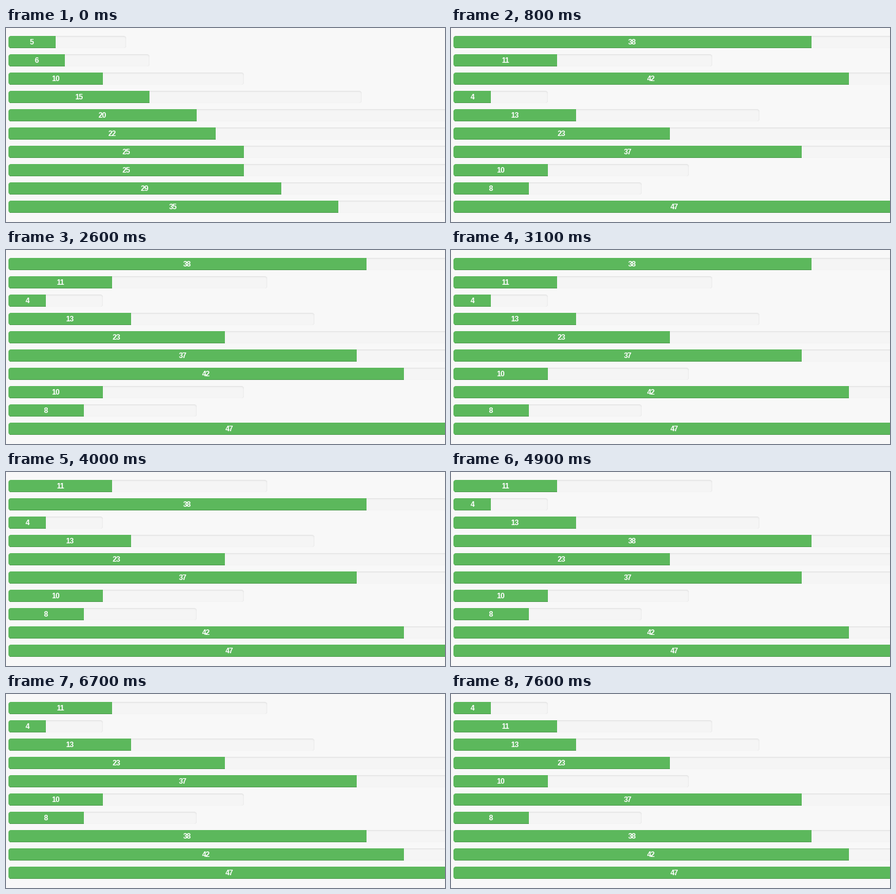
A matplotlib script for the animation above (8 s loop, 716 by 318 pixels).

```python
import matplotlib.pyplot as plt
from matplotlib.animation import FuncAnimation
from matplotlib.patches import PathPatch, Rectangle
from matplotlib.path import Path

W, H, DPI = 716, 318, 100
TICK, LOOP = 100, 8000
LEFT, TOP, ROW, BAR = 4, 13, 30, 20
UNIT, RADIUS = 15.36, 4
GREEN, GREEN_EDGE = "#5cb85c", "#4e9c4e"

# Nested track layers: colour, left, top, right and bottom inset, corner radius
LAYERS = [
    ("#e4e4e4", 0, 0, 0, 0, 4),
    ("#ededed", 0, 1, 0, 0, 4),
    ("#f3f3f3", 1, 2, 1, 0, 3),
    ("#f5f5f5", 2, 3, 2, 1, 2),
]

SORTED = [5, 6, 10, 15, 20, 22, 25, 25, 29, 35]
SHUFFLED = [38, 42, 11, 4, 13, 23, 37, 10, 8, 47]
CHANGES = [300, 800, 1200, 1700, 2100, 2600, 3100, 3500, 4000,
           4400, 4900, 5300, 5800, 6300, 6700, 7200, 7600]


def bubble_sort(values):
    """Yield the list at the start and after every swap."""
    vals = list(values)
    yield vals[:]
    for end in range(len(vals) - 1, 0, -1):
        for i in range(end):
            if vals[i] > vals[i + 1]:
                vals[i], vals[i + 1] = vals[i + 1], vals[i]
                yield vals[:]


def box_path(x0, y0, x1, y1, rl, rr):
    """Rectangle with corner radius rl on the left and rr on the right."""
    kl, kr = 0.4477 * rl, 0.4477 * rr
    verts = [
        (x0 + rl, y0), (x1 - rr, y0),
        (x1 - kr, y0), (x1, y0 + kr), (x1, y0 + rr),
        (x1, y1 - rr),
        (x1, y1 - kr), (x1 - kr, y1), (x1 - rr, y1),
        (x0 + rl, y1),
        (x0 + kl, y1), (x0, y1 - kl), (x0, y1 - rl),
        (x0, y0 + rl),
        (x0, y0 + kl), (x0 + kl, y0), (x0 + rl, y0),
        (x0 + rl, y0),
    ]
    curve = [Path.CURVE4] * 3
    codes = [Path.MOVETO]
    for _ in range(4):
        codes += [Path.LINETO] + curve
    return Path(verts, codes + [Path.CLOSEPOLY])


class Row:
    def __init__(self, ax, index):
        self.y = TOP + ROW * index
        blank = box_path(0, 0, 1, 1, 0, 0)
        self.layers = [ax.add_patch(PathPatch(blank, fc=layer[0], lw=0))
                       for layer in LAYERS]
        self.bar = ax.add_patch(PathPatch(blank, fc=GREEN, lw=0))
        self.edge = ax.add_patch(Rectangle((LEFT + 2, self.y + BAR - 1), 1, 1,
                                           fc=GREEN_EDGE, lw=0))
        self.label = ax.text(0, self.y + 14, "", color="white",
                             family="Liberation Sans", weight="bold",
                             size=12 * 72 / DPI, ha="center", va="baseline")

    def show(self, value):
        y0, y1 = self.y, self.y + BAR
        width = value * UNIT
        end = round(LEFT + width)
        track_end = round(LEFT + 2.5 * width)
        for patch, (_, l, t, r, b, rad) in zip(self.layers, LAYERS):
            patch.set_path(box_path(LEFT + l, y0 + t, track_end - r, y1 - b,
                                    rad, rad))
        self.bar.set_path(box_path(LEFT, y0, end, y1, RADIUS, 0))
        self.edge.set_width(end - LEFT - 2)
        self.label.set_text(str(value))
        self.label.set_x(LEFT + width / 2)


fig = plt.figure(figsize=(W / DPI, H / DPI), dpi=DPI, facecolor="#f8f8f8")
ax = fig.add_axes([0, 0, 1, 1])
ax.set_xlim(0, W)
ax.set_ylim(H, 0)
ax.axis("off")

rows = [Row(ax, i) for i in range(len(SORTED))]
states = [SORTED] + [s for s, _ in zip(bubble_sort(SHUFFLED), CHANGES)]


def update(frame):
    now = frame * TICK
    step = sum(now >= t for t in CHANGES)
    for row, value in zip(rows, states[step]):
        row.show(value)
    return []


anim = FuncAnimation(fig, update, frames=LOOP // TICK, interval=TICK,
                     repeat=True, repeat_delay=0)
plt.show()
```
